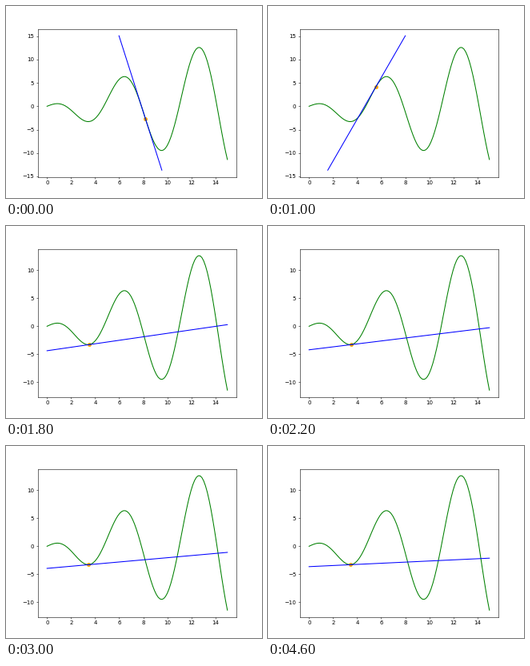
A matplotlib script for the animation above (4800 ms loop, 320 by 240 pixels).

```python
import matplotlib.pyplot as plt
import numpy as np
from matplotlib.animation import FuncAnimation

STEPS = 24
RATE = 0.5
START = 54  # index of the starting sample


def f(x):
    return x * np.cos(x)


def slope(x):
    return np.cos(x) - x * np.sin(x)


xs = np.linspace(0, 15, 100)
ys = f(xs)
low, high = 1.2 * ys.min(), 1.2 * ys.max()

# Gradient descent, one step per frame
path = [xs[START]]
for _ in range(STEPS - 1):
    path.append(path[-1] - RATE * slope(path[-1]))


def tangent(x):
    """End points of the tangent at x, cut to the plotted range."""
    y, m = f(x), slope(x)
    ends = sorted(x + (np.array([low, high]) - y) / m)
    tx = np.clip(ends, xs[0], xs[-1])
    return tx, y + m * (tx - x)


fig, ax = plt.subplots(figsize=(6.4, 4.8), dpi=50)


def draw(i):
    x = path[i]
    ax.clear()
    ax.plot(xs, ys, color="g")
    ax.plot(*tangent(x), color="b")
    ax.scatter(x, f(x), color="orange")


anim = FuncAnimation(fig, draw, frames=STEPS, init_func=lambda: None,
                     interval=200, repeat=True, repeat_delay=0)
plt.show()
```
